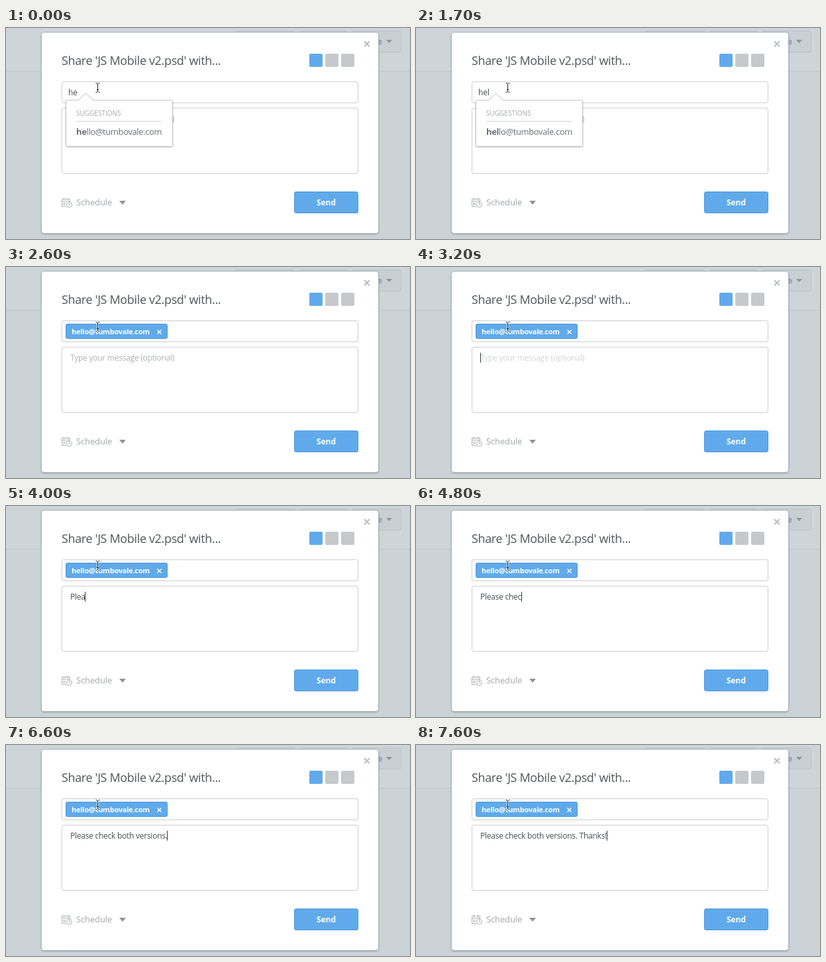
An HTML page for the animation above (8000 ms loop, 610 by 320 pixels).

```html
<!DOCTYPE html>
<html lang="en">
<head>
<meta charset="utf-8">
<title>Share dialog</title>
<style>
  html, body { margin: 0; width: 100%; height: 100%; overflow: hidden; background: #cbd3d7; }
  svg { display: block; width: 610px; height: 320px; }
  text { font: 12px "Open Sans", "Noto Sans", sans-serif; white-space: pre; fill: #4a4f53; }
  .title { font-size: 18px; letter-spacing: -.36px; fill: #50565b; }
  .bold { font-weight: 700; }
  .field { fill: #fff; stroke: #cbced0; }
  .blue { fill: #60aaeb; stroke: #4b97da; }
  .caret { fill: #33383c; }
  .tight { letter-spacing: -.25px; }
  .small { font-size: 10px; fill: #a4a8ab; }
  .suggestion { font-size: 13px; letter-spacing: -.38px; fill: #687178; }
  .pill { font-size: 11px; letter-spacing: -.25px; fill: #fff; }
  .schedule { font-size: 13px; letter-spacing: -.13px; fill: #a2a6a9; }
  .icon { fill: none; stroke: #adb1b4; }
</style>
</head>
<body>
<svg viewBox="0 0 610 320">
  <defs>
    <filter id="shadow" x="-10%" y="-10%" width="120%" height="125%">
      <feDropShadow dx="0" dy="1" stdDeviation="1.2" flood-color="#000" flood-opacity=".25"/>
    </filter>
  </defs>

  <!-- dimmed page -->
  <rect width="610" height="65" fill="#ced5d9"/>
  <rect y="65" width="610" height="1" fill="#c0c8cc"/>
  <g fill="#c9d0d4" stroke="#bac2c6">
    <rect x="345.500" y="4.500" width="90" height="32" rx="3"/>
    <rect x="442.500" y="4.500" width="73" height="32" rx="3"/>
    <rect x="522.500" y="4.500" width="74" height="32" rx="3"/>
  </g>
  <text class="bold" x="561" y="25" style="fill:#8d969b">e</text>
  <path d="M574 18h9l-4.500 5z" fill="#8d969b"/>

  <!-- dialog -->
  <rect x="53.500" y="6.500" width="509" height="305" rx="4" fill="#fff" stroke="#aeb6ba" filter="url(#shadow)"/>
  <path d="M541 20l8 8m0-8l-8 8" stroke="#b6bcc0" stroke-width="1.800"/>
  <text class="title" x="84" y="56">Share 'JS Mobile v2.psd' with...</text>
  <rect x="458" y="39" width="20" height="20" rx="2" fill="#60aaeb"/>
  <rect x="482" y="39" width="20" height="20" rx="2" fill="#c6c9cb"/>
  <rect x="506" y="39" width="20" height="20" rx="2" fill="#c6c9cb"/>

  <rect class="field" x="84.500" y="81.500" width="447" height="32" rx="2.500"/>
  <rect class="field" x="84.500" y="121.500" width="447" height="99" rx="2.500"/>
  <text class="tight" id="placeholder" x="97" y="142">Type your message (optional)</text>
  <text class="tight" id="message" x="97" y="142"></text>
  <rect class="caret" id="messageCaret" y="130" width="1" height="15"/>

  <g class="icon">
    <path d="M91 270.500h-6.500v-11h12v4M84.500 262.500h12M87.500 257.500v3M93.500 257.500v3M86 265.500h4M86 267.500h4"/>
    <circle cx="95.500" cy="268" r="4"/>
    <path d="M95.500 265.500v2.500h2"/>
  </g>
  <text class="schedule" x="106" y="269">Schedule</text>
  <path d="M171 262h10l-5 6z" fill="#8f9598"/>
  <rect class="blue" x="435.500" y="248.500" width="96" height="32" rx="2.500"/>
  <text class="bold" x="483.500" y="269" text-anchor="middle" style="fill:#fff">Send</text>

  <g id="lookup">
    <text id="query" x="94" y="102"></text>
    <path d="M90.500 111.500q0-2 2-2h17l11-10.500 11 10.500h118q2 0 2 2v66q0 2-2 2h-157q-2 0-2-2z"
      fill="#fff" stroke="#c3c7c9" filter="url(#shadow)"/>
    <text class="small" x="106" y="133">SUGGESTIONS</text>
    <rect x="106" y="141" width="130" height="1" fill="#d3d6d8"/>
    <text class="suggestion" x="106" y="162"><tspan class="bold" id="matched"></tspan><tspan id="rest"></tspan></text>
  </g>

  <g id="recipient">
    <rect class="blue" x="90.500" y="86.500" width="153" height="22" rx="2"/>
    <text class="pill bold" id="address" x="99" y="102"></text>
    <path d="M228.500 95.500l6 6m0-6l-6 6" stroke="#fff" stroke-width="1.500"/>
  </g>
  <rect class="caret" id="inputCaret" y="90" width="1" height="15"/>

  <!-- text pointer -->
  <g fill="none">
    <path id="beam" d="M135.500 83.500h1.500l1.500 1.500 1.500-1.500h1.500M138.500 85v11M135.500 97.500h1.500l1.500-1.500 1.500 1.500h1.500M137 93.500h3"
      stroke="#fff" stroke-width="2.500" stroke-opacity=".55"/>
    <use href="#beam" style="stroke:#222"/>
    <path d="M135.500 83.500h1.500l1.500 1.500 1.500-1.500h1.500M138.500 85v11M135.500 97.500h1.500l1.500-1.500 1.500 1.500h1.500M137 93.500h3" stroke="#222"/>
  </g>
</svg>
<script>
const LOOP = 8000, PICK = 2100, FOCUS = 3200, BLINK = 500;
const EMAIL = "hello@tumbovale.com";
const MESSAGE = "Please check both versions. Thanks!";
// [time in ms, characters typed so far]
const KEYS = [
  [3600, 1], [3800, 2], [4000, 4], [4200, 5], [4300, 6], [4500, 7], [4600, 8], [4800, 11],
  [5000, 12], [5100, 13], [5200, 14], [5400, 16], [5600, 17], [5700, 18], [5800, 19], [5900, 20],
  [6000, 22], [6200, 23], [6300, 25], [6400, 26], [6600, 27], [6800, 28],
  [7000, 29], [7100, 30], [7200, 32], [7300, 34], [7600, 35]
];

const el = id => document.getElementById(id);
const show = (id, visible) => el(id).style.display = visible ? "" : "none";
const blinkOn = (t, start) => t >= start && Math.floor((t - start) / BLINK) % 2 === 0;
const typedAt = t => KEYS.reduce((count, [time, n]) => t >= time ? n : count, 0);

el("address").textContent = EMAIL;

function draw(t) {
  const picked = t >= PICK, focused = t >= FOCUS;
  const matched = t < 200 ? 2 : 3;
  const typed = typedAt(t);

  show("lookup", !picked);
  show("recipient", picked);
  el("query").textContent = EMAIL.slice(0, matched);
  el("matched").textContent = EMAIL.slice(0, matched);
  el("rest").textContent = EMAIL.slice(matched);
  el("inputCaret").setAttribute("x", picked ? 252 : 110);
  show("inputCaret", !focused && blinkOn(t, picked ? PICK : 200));

  show("placeholder", !typed);
  el("placeholder").style.fill = focused ? "#d3d5d7" : "#adb1b4";
  el("message").textContent = MESSAGE.slice(0, typed);
  const width = typed ? el("message").getComputedTextLength() : 0;
  el("messageCaret").setAttribute("x", 97 + Math.floor(width));
  show("messageCaret", focused);
}

function tick() {
  draw(performance.now() % LOOP);
  requestAnimationFrame(tick);
}
tick();
</script>
</body>
</html>
```
